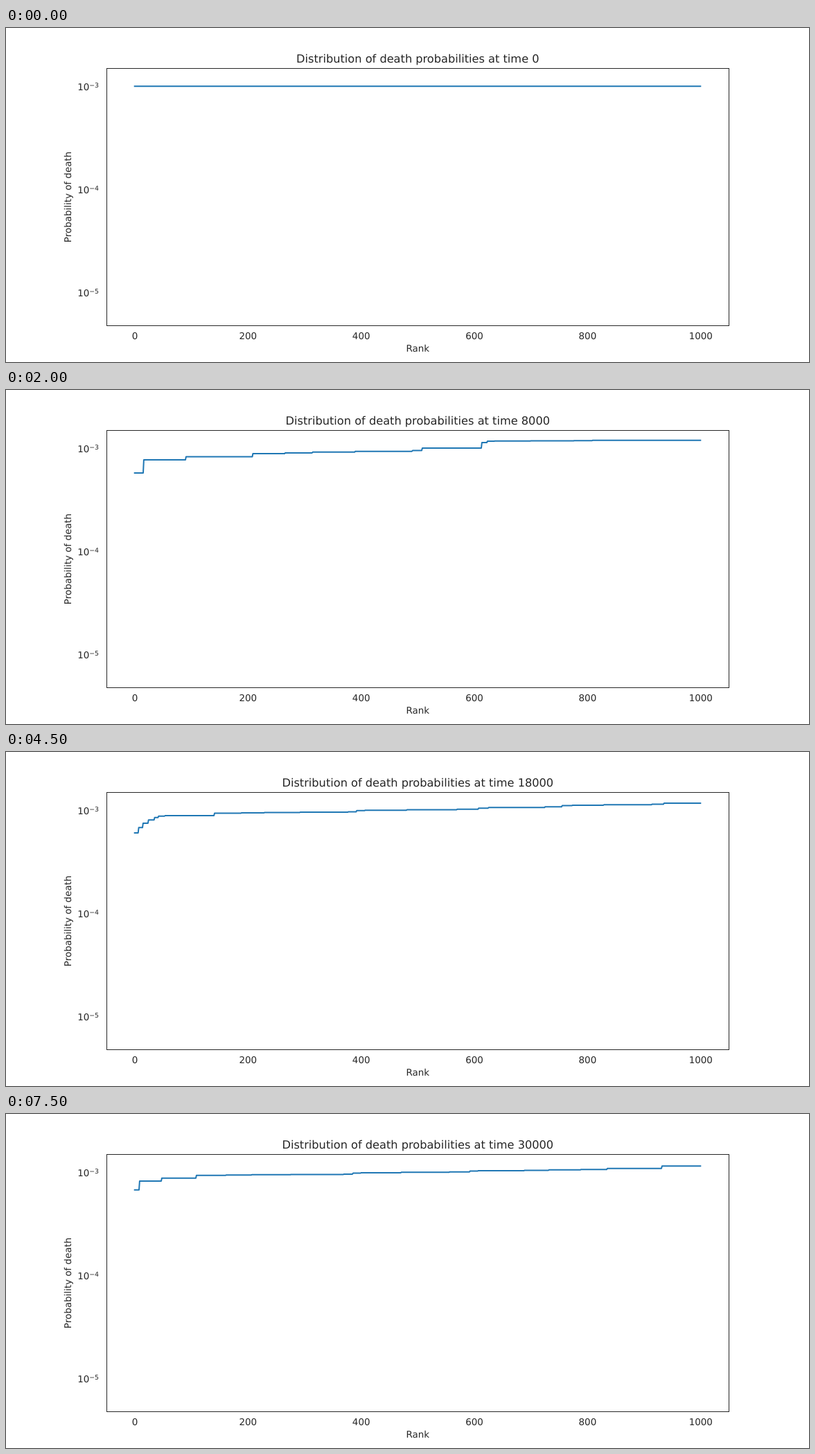
An HTML page with a canvas for the animation above (8 s loop, 1159 px wide and 483 px high).

```html
<!DOCTYPE html>
<html lang="en">
<head>
<meta charset="utf-8">
<title>Distribution of death probabilities</title>
<style>
  html, body { margin: 0; width: 1159px; height: 483px; overflow: hidden; background: #fff; }
  canvas, svg { position: absolute; left: 0; top: 0; display: block; }
  text { font: 13.45px "DejaVu Sans", sans-serif; fill: #262626; text-rendering: geometricPrecision; }
  .mid { text-anchor: middle; }
  #title { font-size: 16.2px; }
  .exp { font-size: 9.4px; }
</style>
</head>
<body>
<canvas id="plot" width="1159" height="483"></canvas>
<svg id="labels" width="1159" height="483">
  <text id="title" class="mid" x="594.3" y="50.2"></text>
  <text class="mid" x="594.2" y="468">Rank</text>
  <text class="mid" transform="translate(94 244.5) rotate(-90)">Probability of death</text>
</svg>
<script>
const LEFT = 185.7, RIGHT = 1002.3, STEP = 500, LOOP = 8000;
const ctx = document.getElementById('plot').getContext('2d');
const title = document.getElementById('title');
const labels = document.getElementById('labels');

function label(text, x, y, cls) {
  const el = document.createElementNS('http://www.w3.org/2000/svg', 'text');
  el.setAttribute('x', x);
  el.setAttribute('y', y);
  el.setAttribute('class', cls);
  el.textContent = text;
  labels.append(el);
}

for (let i = 0; i <= 5; i++) label(i * 200, 186 + i * 163.35, 450, 'mid');
for (let i = 0; i < 3; i++) {
  const y = 90.4 + i * 149;
  label('10', 103.3, y, '');
  label('\u2212' + (i + 3), 120.2, y - 4.3, 'exp');
}

function random(seed) {
  return () => (seed = (seed * 16807) % 2147483647) / 2147483647;
}

// Staircase: first height, then pairs of (x of the jump, new height).
// On long runs the level already creeps towards the next height in small steps.
function stairs(y, ...jumps) {
  const rnd = random(7919);
  const pts = [[LEFT, y]];
  let last = LEFT;
  const jump = (x, to) => {
    pts.push([x, y], [x + 0.9, to]);
    y = to;
  };
  for (let i = 0; i < jumps.length; i += 2) {
    const [x, to] = jumps.slice(i, i + 2);
    const run = x - last, from = y;
    const n = run > 100 ? Math.round(run / 55) : 0;
    for (let k = 1; k <= n; k++) {
      jump(last + run * (k - 0.2 - 0.6 * rnd()) / n, from + (to - from) * 0.55 * k / n);
    }
    jump(x, to);
    last = x;
  }
  pts.push([RIGHT, y]);
  return pts;
}

// Staircase that climbs from low within a given width, then slowly to the top.
function climb(seed, low, width) {
  const rnd = random(seed * 7919);
  const knee = 92, top = 74, head = 6, tail = 5;
  const jumps = [];
  for (let i = 1; i <= head; i++) {
    const u = i / head;
    jumps.push(LEFT + width * (u - 0.1 * rnd()), knee + (low - knee) * (1 - u) ** 2);
  }
  const start = LEFT + width;
  for (let i = 1; i <= tail; i++) {
    const u = (i - 0.6 * rnd()) / tail;
    jumps.push(start + (RIGHT - start) * u, knee + (top - knee) * i / tail);
  }
  return stairs(low, ...jumps);
}

const curves = [
  stairs(84.2),
  climb(1, 413, 150),
  stairs(293, 187.5, 289.8, 203.7, 242.5, 206, 230.3, 217, 211.5, 287, 203,
    299.3, 151, 310, 121, 338.5, 117, 345, 88, 353, 73.2),
  climb(3, 154, 200),
  stairs(120, 198, 101, 259, 96.5, 355.5, 92, 600, 84, 686, 76, 694, 74, 846, 72.7),
  climb(5, 226, 45),
  climb(6, 236, 60),
  stairs(162, 218.3, 137, 228.5, 100, 233, 91.2, 423, 84.5, 838, 75.2),
  climb(8, 118, 45),
  climb(9, 117, 45),
  climb(10, 130, 40),
  stairs(154.7, 189, 147, 191.4, 104, 193.5, 100, 215, 94.5, 275, 89.5, 432, 86,
    800, 79, 862, 75.8),
  climb(12, 158, 40),
  stairs(129.3, 185.8, 105.3, 255, 97, 279, 91, 501, 85, 602, 80.3, 874, 78.3, 925, 72.8),
  climb(14, 116, 45),
  stairs(109.8, 192, 97, 224, 92.8, 274, 88.7, 500, 85.5, 669, 82.4, 867, 78.7, 946, 75.2)
];

function draw(i) {
  ctx.fillStyle = '#fff';
  ctx.fillRect(0, 0, 1159, 483);

  ctx.beginPath();
  for (const [x, y] of curves[i]) ctx.lineTo(x, y);
  ctx.strokeStyle = '#1f77b4';
  ctx.lineWidth = 2;
  ctx.lineCap = 'square';
  ctx.lineJoin = 'round';
  ctx.stroke();

  ctx.strokeStyle = '#262626';
  ctx.lineWidth = 1;
  ctx.lineJoin = 'miter';
  ctx.strokeRect(145.5, 58.5, 898, 372);

  title.textContent = 'Distribution of death probabilities at time ' + i * 2000;
}

const start = performance.now();
let shown = -1;
function tick(now) {
  const i = Math.floor(Math.max(0, now - start) % LOOP / STEP);
  if (i !== shown) draw(shown = i);
  requestAnimationFrame(tick);
}
tick(start);
</script>
</body>
</html>
```
